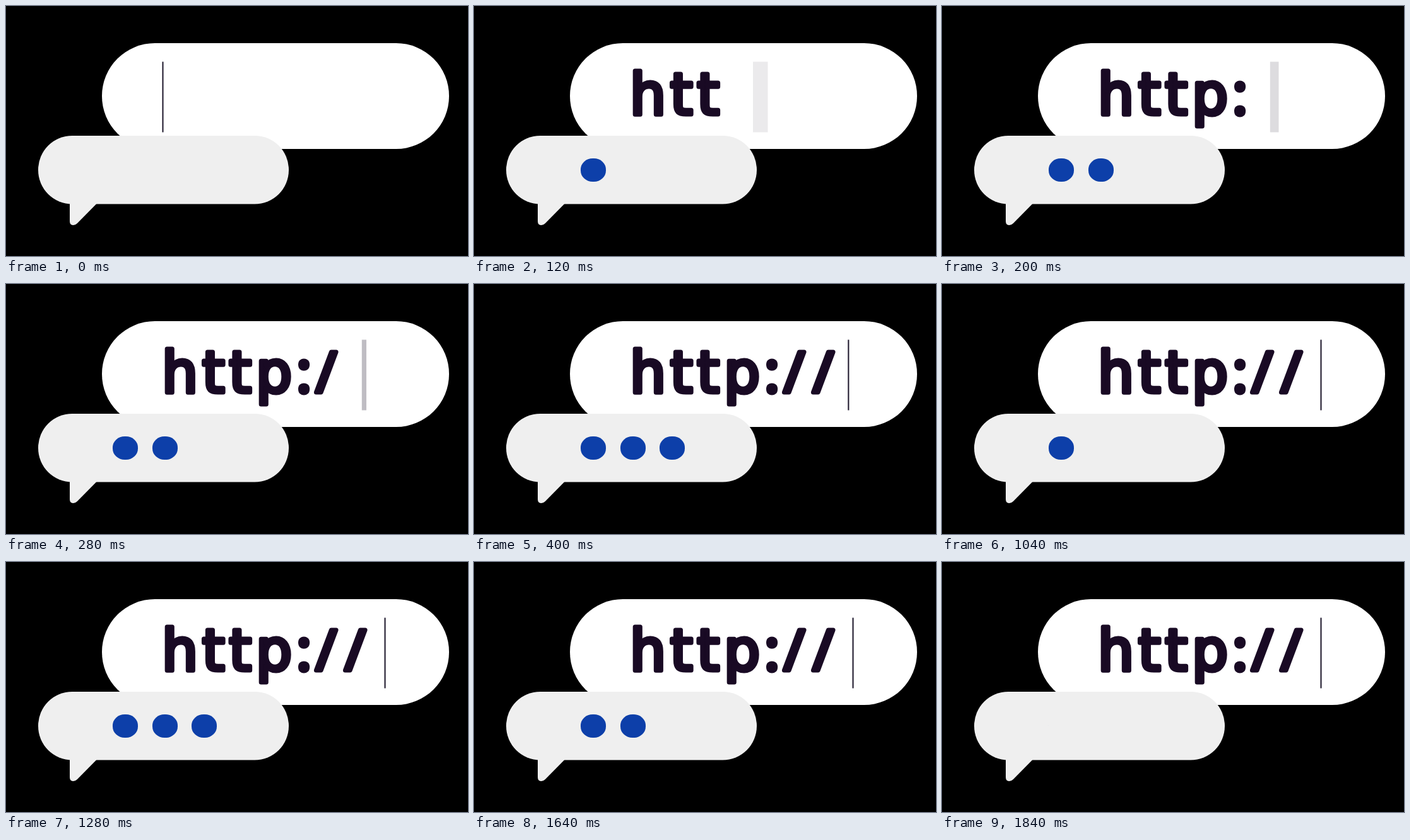
Animation, 732 px wide and 397 px high, one loop 2 s. Source, as an HTML page:

```html
<!DOCTYPE html>
<html lang="en">
<head>
<meta charset="utf-8">
<title>Typing a web address</title>
<style>
  html, body { margin: 0; width: 100%; height: 100%; overflow: hidden; background: #000; }
  svg { display: block; width: 100%; height: 100%; }
  .address {
    font: 400 90px "DejaVu Sans", sans-serif;
    fill: #190a24; stroke: #190a24; stroke-width: 7; stroke-linejoin: round;
  }
  .sign { font-family: "Noto Sans", "Open Sans", sans-serif; }
</style>
</head>
<body>
<svg viewBox="0 0 732 397">
  <rect x="152" y="59" width="550" height="168" rx="84" fill="#fff"/>
  <text class="address" y="171.5"></text>
  <rect id="caret" y="88.5" height="112" fill="#1a1428"/>
  <g fill="#efefef">
    <rect x="51" y="206" width="397" height="108.5" rx="54"/>
    <path d="M101 300V342Q101 348 107 348Q110 348 113 345L143.500 314V300Z"/>
  </g>
  <g id="dots" fill="#0d3fa9"></g>
</svg>
<script>
const LOOP = 2000, TICK = 40;
const CARET = { from: 248.5, to: 600.5, time: 720, power: 4.8, width: 2 };
const DOTS = { period: 960, on: [80, 200, 320], off: [880, 760, 680] };

// Each character: glyph, left position, right edge of its ink
const CHARS = [
  ["h", 247, 303], ["t", 311, 348], ["t", 353.5, 389], ["p", 396, 457],
  [":", 460, 480], ["/", 490.5, 527], ["/", 536.5, 573]
];
const GAP = 15;

const make = (name, parent, attrs) => {
  const el = document.createElementNS("http://www.w3.org/2000/svg", name);
  for (const key in attrs) el.setAttribute(key, attrs[key]);
  return parent.appendChild(el);
};
const show = (el, on) => el.setAttribute("visibility", on ? "visible" : "hidden");

const line = document.querySelector(".address");
const caret = document.getElementById("caret");
const letters = CHARS.map(([glyph, x]) => {
  const el = make("tspan", line, { x, class: /\w/.test(glyph) ? "" : "sign" });
  el.textContent = glyph;
  return el;
});
const dots = [189, 252, 314].map(x => make("rect", document.getElementById("dots"),
  { x: x - 20, y: 242, width: 40, height: 37, rx: 19, ry: 17.5 }));

function draw(ms) {
  const t = Math.floor((ms % LOOP) / TICK) * TICK;
  const left = Math.max(0, 1 - t / CARET.time);
  const span = CARET.to - CARET.from;
  const x = CARET.to - span * left ** CARET.power;

  // Half a tick of motion blur spreads the caret and thins its colour
  const speed = t ? span * CARET.power / CARET.time * left ** (CARET.power - 1) : 0;
  const width = Math.max(CARET.width, speed * TICK / 2);
  caret.setAttribute("x", x - width / 2);
  caret.setAttribute("width", width);
  caret.setAttribute("opacity", CARET.width / width);

  letters.forEach((el, i) => show(el, CHARS[i][2] + GAP < x));
  const phase = t % DOTS.period;
  dots.forEach((el, i) => show(el, phase >= DOTS.on[i] && phase < DOTS.off[i]));
}

const start = performance.now();
function frame() {
  draw(performance.now() - start);
  requestAnimationFrame(frame);
}
frame();
</script>
</body>
</html>
```
